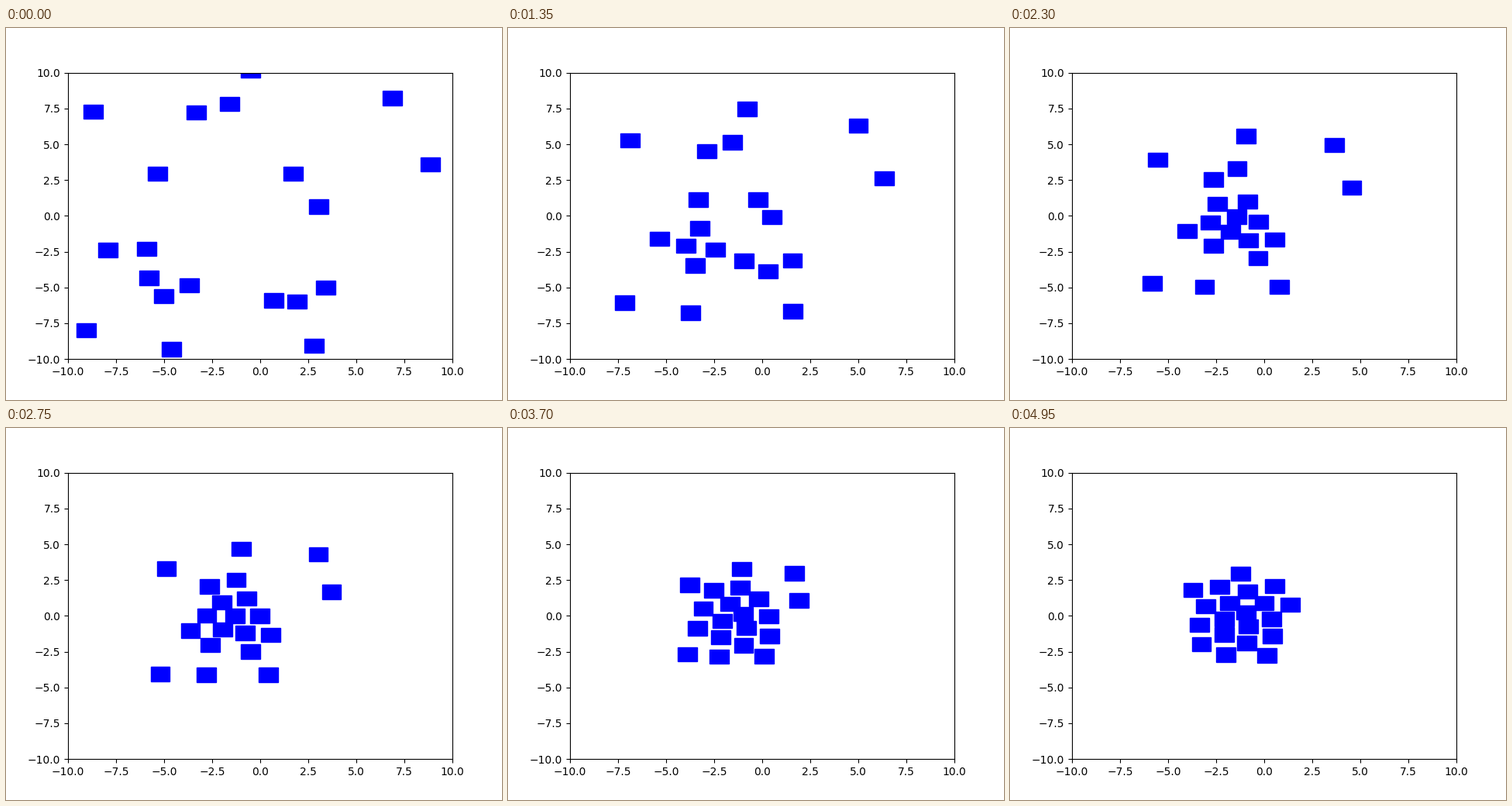
These frames come from a looping animation (640x480 px, 5 s). A matplotlib script:

```python
import numpy as np
import matplotlib.pyplot as plt
from matplotlib.animation import FuncAnimation
from matplotlib.patches import Rectangle

FRAMES, INTERVAL = 100, 50
SPEED = 0.1         # units per frame towards the swarm's centre
SPACING = 1.52      # robots closer than this push apart
PUSH = 0.38         # share of the missing gap regained per frame

START = np.array([
    (-8.69, 7.27), (-3.34, 7.22), (-1.59, 7.81), (-0.50, 10.14),
    (6.88, 8.22), (8.86, 3.59), (1.72, 2.94), (3.05, 0.64),
    (-5.34, 2.94), (-5.90, -2.31), (-7.92, -2.39), (-5.80, -4.33),
    (-5.02, -5.61), (-3.69, -4.85), (-9.05, -7.99), (-4.61, -9.31),
    (0.71, -5.90), (1.92, -5.98), (3.41, -5.01), (2.81, -9.07),
])


def cohesion(spot, centre):
    gap = centre - spot
    dist = np.hypot(*gap)
    return gap * min(SPEED / max(dist, 1e-9), 1)


def separation(spot, others):
    away = spot - others
    dist = np.hypot(away[:, 0], away[:, 1])
    missing = np.clip(SPACING - dist, 0, None)
    return (PUSH * (missing / dist)[:, None] * away).sum(axis=0)


def simulate():
    """Gather the swarm; robots nearer the centre react first."""
    reach = np.hypot(*(START - START.mean(axis=0)).T)
    swarm = START[np.argsort(reach)]
    track = [swarm.copy()]
    for _ in range(FRAMES - 1):
        centre = swarm.mean(axis=0)
        for i, spot in enumerate(swarm):
            others = np.delete(swarm, i, axis=0)
            swarm[i] = spot + cohesion(spot, centre) + separation(spot, others)
        track.append(swarm.copy())
    return track


track = simulate()

fig, ax = plt.subplots(figsize=(6.4, 4.8), dpi=100)
ax.set_xlim(-10, 10)
ax.set_ylim(-10, 10)
robots = [ax.add_patch(Rectangle((0, 0), 1, 1, color="blue")) for _ in START]


def update(frame):
    for robot, spot in zip(robots, track[frame]):
        robot.set_xy(spot - 0.5)
    return robots


anim = FuncAnimation(fig, update, frames=FRAMES, interval=INTERVAL,
                     repeat=True, repeat_delay=0)
plt.show()
```
